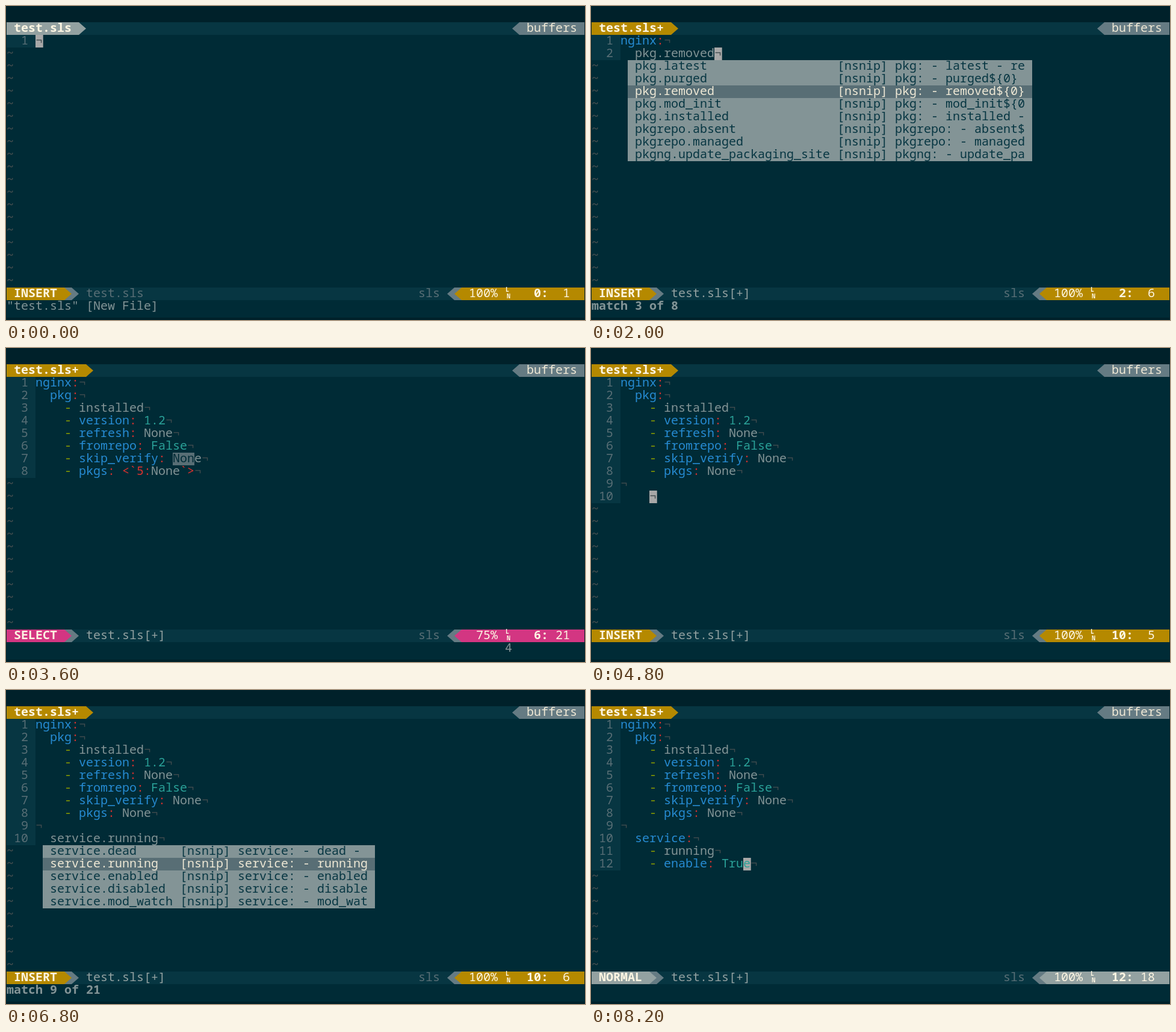
Recreate the animation shown at these times as an HTML page with a canvas. Size 962 px wide and 522 px high, loop 9200 ms.

```html
<!DOCTYPE html>
<html lang="en">
<head>
<meta charset="utf-8">
<title>Editor session</title>
<style>
html, body { margin: 0; width: 100%; height: 100%; overflow: hidden; background: #00212a; }
canvas { display: block; }
</style>
</head>
<body>
<canvas id="stage" width="962" height="522"></canvas>
<script>
const ctx = document.getElementById('stage').getContext('2d');
const LOOP = 9200, CW = 12, RH = 21, LEFT = 1, TOP = 27, GUTTER = 4;
const C = {
  edge: '#00212a', bg: '#002b36', bar: '#073642', dim: '#586e75', mid: '#657b83',
  text: '#839496', pale: '#93a1a1', cream: '#eee8d5', white: '#fdf6e3', faint: '#414c4e',
  cursor: '#a8a8a8', yellow: '#b58900', orange: '#cb4b16', red: '#dc322f',
  magenta: '#d33682', blue: '#268bd2', cyan: '#2aa198', green: '#859900'
};
const MODES = { INSERT: C.yellow, SELECT: C.magenta, NORMAL: C.pale };

// Completion menus
const pkgMenu = { row: 3, pad: 28, items: ['pkg.latest', 'pkg.purged', 'pkg.removed', 'pkg.mod_init',
  'pkg.installed', 'pkgrepo.absent', 'pkgrepo.managed', 'pkgng.update_packaging_site'] };
const serviceMenu = { row: 11, pad: 18, items: ['service.dead', 'service.running', 'service.enabled',
  'service.disabled', 'service.mod_watch'] };
const tails = { latest: ' - refresh', installed: ' - version', dead: ' - sig' };

function menuLine(name, pad) {
  const [mod, fn] = name.split('.');
  const body = `${mod}: - ${fn}${tails[fn] || '${0}'}`;
  return name.padEnd(pad) + '[nsnip] ' + body.slice(0, 18);
}

// Document contents
const keys = ['version', 'refresh', 'fromrepo', 'skip_verify', 'pkgs'];
const pkg = (...values) => ['nginx:', '  pkg:', '    - installed',
  ...keys.map((k, i) => `    - ${k}: ` + (values[i] || '<`' + (i + 1) + ':None`>'))];
const full = pkg('1.2', 'None', 'False', 'None', 'None');
const service = value => [...full, '', '  service:', '    - running', '    - enable: ' + value];

const back = 'Back at original';
const first = (tail, col, more) => ({ lines: ['nginx:', tail], pos: [2, col], ...more });
const tenth = (tail, col, more) => ({ lines: [...full, '', tail], pos: [10, col], ...more });
const pickPkg = i => first('  ' + pkgMenu.items[i], 6,
  { menu: pkgMenu, pick: i, msg: `match ${i + 1} of 8`, cur: [1, 2 + pkgMenu.items[i].length] });
const pickService = i => tenth('  ' + serviceMenu.items[i], 6,
  { menu: serviceMenu, pick: i, msg: `match ${i + 8} of 21` });
const select = (lines, line, col, pos) => ({ lines, pos, mode: 'SELECT', sel: [line - 1, col] });

const steps = [
  [0, { lines: [''], pos: [0, 1], msg: '"test.sls" [New File]', cur: [0, 0] }],
  [200, { lines: ['n'], pos: [1, 2], cur: [0, 1] }],
  [400, { lines: ['ngi'], pos: [1, 4], cur: [0, 3] }],
  [600, { lines: ['nginx'], pos: [1, 6], msg: back }],
  [800, { lines: ['nginx:'], pos: [1, 7], cur: [0, 6] }],
  [1000, first('  ', 3, { cur: [1, 2] })],
  [1200, first('  p', 4, { cur: [1, 3] })],
  [1400, first('  pkg', 4, { msg: back })],
  [1600, first('  pkg', 6, { msg: back, menu: pkgMenu, cur: [1, 5] })],
  [1800, pickPkg(1)],
  [2000, pickPkg(2)],
  [2200, pickPkg(3)],
  [2400, pickPkg(4)],
  [2600, select(pkg('None'), 4, 15, [4, 18])],
  [2800, { lines: pkg('1.2'), pos: [4, 18], cur: [3, 18] }],
  [3000, select(pkg('1.2', 'None'), 5, 15, [4, 18])],
  [3200, select(pkg('1.2', 'None', 'None'), 6, 16, [5, 19])],
  [3400, { lines: pkg('1.2', 'None', 'False'), pos: [6, 21], cur: [5, 21] }],
  [3600, select(pkg('1.2', 'None', 'False', 'None'), 7, 19, [6, 21])],
  [3800, select(full, 8, 12, [7, 23])],
  [4000, { lines: full, pos: [8, 16] }],
  [4200, { lines: full, pos: [8, 17], cur: [7, 16] }],
  [4600, { lines: [...full, '    '], pos: [9, 5], cur: [8, 4] }],
  [4800, tenth('    ', 5, { cur: [9, 4] })],
  [5000, tenth('  ', 3)],
  [5200, tenth('  ', 3, { cur: [9, 2] })],
  [5600, tenth('  s', 4, { cur: [9, 3] })],
  [5800, tenth('  se', 4)],
  [6000, tenth('  ser', 4, { msg: back, leftover: true })],
  [6200, tenth('  ser', 6, { msg: back })],
  [6400, tenth('  ser', 6, { msg: back, menu: serviceMenu })],
  [6600, pickService(0)],
  [6800, pickService(1)],
  [7000, select(service('None'), 12, 14, [12, 17])],
  [7200, { lines: service('T'), pos: [12, 16], cur: [11, 15] }],
  [7400, { lines: service('Tr'), pos: [12, 17] }],
  [7600, { lines: service('Tru'), pos: [12, 18], cur: [11, 17] }],
  [7800, { lines: service('True'), pos: [12, 19], cur: [11, 18] }],
  [8000, { lines: service('True'), pos: [12, 18], mode: 'NORMAL' }],
  [8200, { lines: service('True'), pos: [12, 18], mode: 'NORMAL', cur: [11, 17] }]
];

// Drawing on the character grid
const x = col => LEFT + col * CW;
const y = row => TOP + row * RH;

function fill(col, row, cols, color) {
  ctx.fillStyle = color;
  ctx.fillRect(x(col), y(row), cols * CW, RH);
}

function put(str, col, row, color, bold) {
  ctx.font = (bold ? 'bold ' : '') + '20px "Noto Sans Mono", "DejaVu Sans Mono", monospace';
  ctx.fillStyle = color;
  ctx.fillText(str, x(col), y(row) + 16);
}

// Triangle filling one cell; dir 1 points right, -1 points left
function arrow(col, row, dir, color) {
  const base = x(dir > 0 ? col : col + 1);
  ctx.fillStyle = color;
  ctx.beginPath();
  ctx.moveTo(base, y(row));
  ctx.lineTo(base + dir * CW, y(row) + RH / 2);
  ctx.lineTo(base, y(row) + RH);
  ctx.fill();
}

function tokenColor(tok, next) {
  if (/^(<`\d:|`>|:)$/.test(tok)) return C.red;
  if (tok === '-') return C.green;
  if (next === ':') return C.blue;
  return /^(\d[\d.]*|True|False)$/.test(tok) ? C.cyan : C.text;
}

function drawLine(line, i) {
  const row = i + 1;
  fill(0, row, GUTTER, C.bar);
  put(String(i + 1).padStart(3), 0, row, C.dim);
  for (const m of line.matchAll(/<`\d:|`>|:|-|[\w.]+/g))
    put(m[0], GUTTER + m.index, row, tokenColor(m[0], line[m.index + m[0].length]));
  put('¬', GUTTER + line.length, row, C.faint);
}

function drawTabs(changed) {
  const label = changed ? ' test.sls+ ' : ' test.sls ';
  const color = changed ? C.yellow : C.pale;
  fill(0, 0, 80, C.bar);
  fill(0, 0, label.length, color);
  arrow(label.length, 0, 1, color);
  put(label, 0, 0, C.white, true);
  arrow(70, 0, -1, C.mid);
  fill(71, 0, 9, C.mid);
  put('buffers', 72, 0, C.cream);
}

function drawStatus(s, changed) {
  const row = 21, mode = s.mode || 'INSERT', color = MODES[mode];
  const [line, col] = s.pos;
  const percent = line ? Math.floor(100 * line / s.lines.length) : 100;
  fill(0, row, 80, C.bar);
  fill(0, row, 8, color);
  put(mode, 1, row, C.white, true);
  fill(8, row, 1, C.mid);
  arrow(8, row, 1, color);
  arrow(9, row, 1, C.mid);
  put(changed ? 'test.sls[+]' : 'test.sls', 11, row, changed ? C.pale : C.dim);
  put('sls', 57, row, C.dim);
  arrow(61, row, -1, C.mid);
  fill(62, row, 1, C.mid);
  arrow(62, row, -1, color);
  fill(63, row, 17, color);
  put(`${percent}%`.padStart(4), 64, row, C.white);
  ctx.font = 'bold 10px "Noto Sans Mono", monospace';
  ctx.fillText('L', 830, 475);
  ctx.fillText('N', 832, 486);
  put(`${line}:`.padStart(3), 72, row, C.white, true);
  put(String(col).padStart(2), 76, row, C.white);
}

function drawMenu({ row, pad, items }, pick) {
  items.forEach((name, i) => {
    const on = i === pick;
    fill(5, row + i, pad + 28, on ? C.dim : C.text);
    put(menuLine(name, pad), 6, row + i, on ? C.cream : C.bar);
  });
}

function drawLeftover() {
  fill(5, 21, 53, C.text);
  put(menuLine('service.enabled', 24), 6, 21, C.bar);
  fill(58, 21, 1, C.cream);
}

function draw(s) {
  const changed = s.lines[0] !== '';
  ctx.fillStyle = C.edge;
  ctx.fillRect(0, 0, 962, 522);
  ctx.fillStyle = C.bg;
  ctx.fillRect(LEFT, TOP, 960, 491);
  drawTabs(changed);
  for (let row = s.lines.length + 1; row < 21; row++) put('~', 0, row, C.faint, true);
  s.lines.forEach(drawLine);
  if (s.sel) {
    const [line, col] = s.sel;
    fill(GUTTER + col, line + 1, 3, C.dim);
    put('Non', GUTTER + col, line + 1, C.bg);
    put('4', 69, 22, C.text);
  }
  if (s.cur) {
    const [line, col] = s.cur, ch = s.lines[line][col];
    fill(GUTTER + col, line + 1, 1.06, C.cursor);
    put(ch || '¬', GUTTER + col, line + 1, ch ? C.cyan : C.faint);
  }
  drawStatus(s, changed);
  if (s.menu) drawMenu(s.menu, s.pick);
  if (s.leftover) drawLeftover();
  if (s.msg) put(s.msg, 0, 22, s.msg === back ? C.orange : C.text, changed);
}

function tick() {
  const t = performance.now() % LOOP;
  draw(steps.findLast(([start]) => start <= t)[1]);
  requestAnimationFrame(tick);
}
tick();
</script>
</body>
</html>
```
